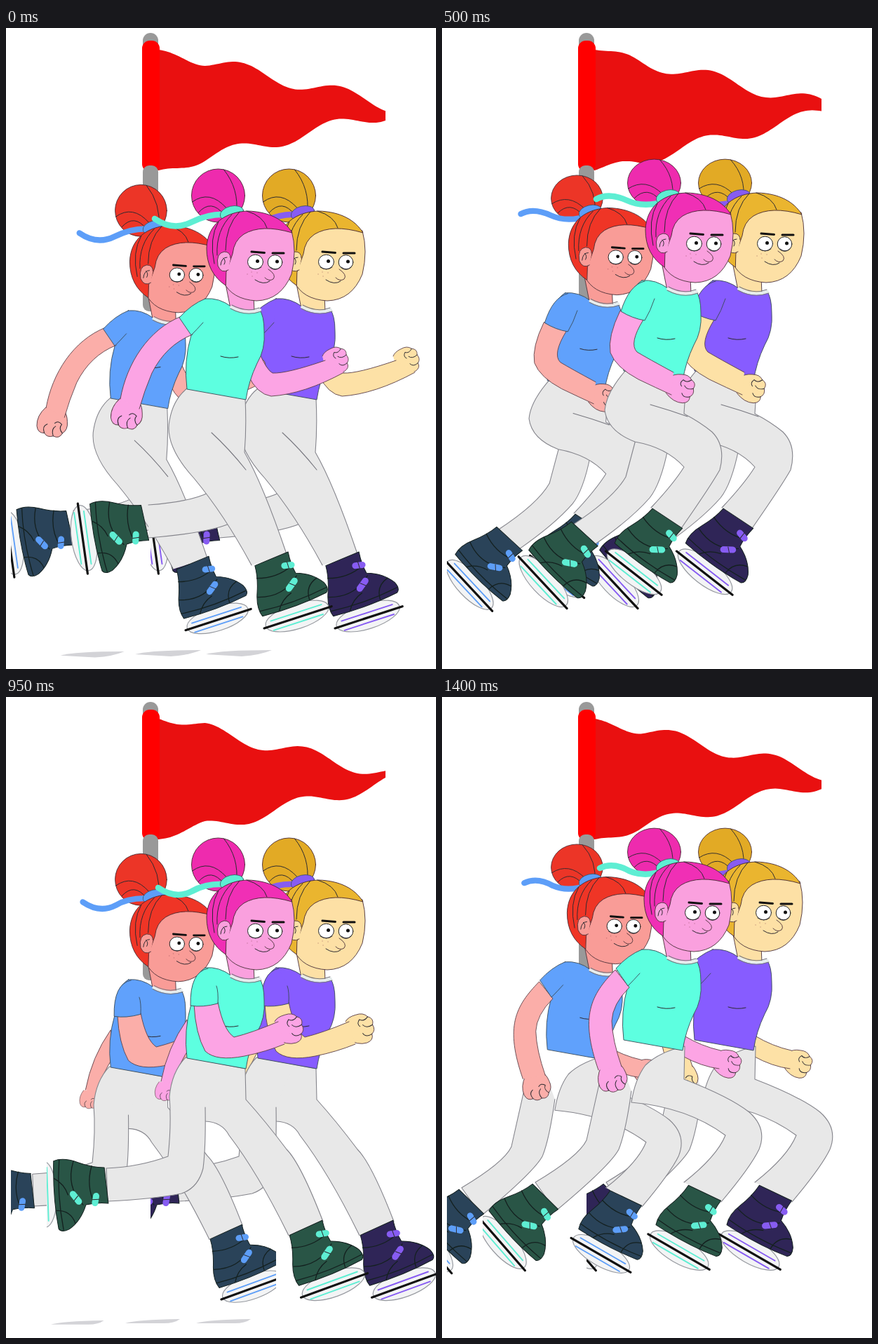
An HTML page for the animation above (1.45 s loop, 613 by 914 pixels).

```html
<!DOCTYPE html>
<html lang="en">
<head>
<meta charset="utf-8">
<title>Skaters running past a flag</title>
<style>
html, body { margin: 0; width: 100%; height: 100%; overflow: hidden; background: #fff; }
svg { display: block; width: 613px; height: 914px; }
svg * { stroke-linecap: round; stroke-linejoin: round; }
.hair { fill: var(--hair); stroke: #44262f; stroke-width: .9; }
.bun { fill: var(--bun); stroke: #44262f; stroke-width: .9; }
.face { fill: var(--face); stroke: #4a3038; stroke-width: .9; }
.arm { fill: var(--arm); stroke: #5b4048; stroke-width: .9; }
.shirt { fill: var(--shirt); stroke: #3a4a55; stroke-width: .9; }
.leg { fill: #e8e8e8; stroke: #85858c; stroke-width: 1.1; }
.boot { fill: var(--boot); stroke: #14201f; stroke-width: 1; }
.line { fill: none; stroke: #2c2a30; stroke-width: 1; }
.seam { fill: none; stroke: #14201f; stroke-width: 1.3; }
.crease { fill: none; stroke: #77777f; stroke-width: 1.1; }
.band { fill: none; stroke: var(--trim); stroke-width: 9; }
.tie { fill: var(--trim); stroke: #35505a; stroke-width: .7; }
.tail { fill: none; stroke: var(--trim); stroke-width: 8.5; }
.blade { fill: #f3f4f5; stroke: #96999f; stroke-width: 1.2; }
.edge { fill: none; stroke: var(--trim); stroke-width: 1.9; }
.shadow { fill: #d3d3d7; }
</style>
</head>
<body>
<svg viewBox="0 0 613 914">
  <defs>
    <clipPath id="c0"><rect x="206" width="407" height="914"/></clipPath>
    <clipPath id="c1"><rect x="7" width="378" height="914"/></clipPath>
    <clipPath id="c2"><rect x="58" width="555" height="914"/></clipPath>
  </defs>
  <rect x="195" y="7" width="22" height="60" rx="11" fill="#999"/>
  <path id="flag" fill="#e91010"/>
  <rect x="194" y="18" width="25" height="187" rx="11" fill="#f00"/>
  <rect x="195" y="196" width="22" height="208" rx="9" fill="#999"/>
  <g id="team"></g>
</svg>
<script>
const LOOP = 1450, STEP = 50;

const path = (cls, d) => `<path class="${cls}" d="${d}"/>`;
const group = (tf, body) => `<g transform="${tf}">${body}</g>`;

const backSleeve = "M284 386 Q264 394 247 413 L264 438 Q272 430 281 420";

const poses = [
  { dy: 0, hx: 0, bun: [239, 37], sleeve: backSleeve,
    tail: "M212 272 Q238 290 264 277 Q290 264 316 266",
    near: "M350 766 Q312 695 268 642 Q226 596 233 560 Q238 530 258 514 L341 528 Q343 570 340 605 Q366 650 400 750",
    crease: "M293 577 Q318 600 342 630", nearBoot: [378, 757, -18],
    far: "M203 680 Q262 676 290 662 L300 640 L345 640 Q350 690 320 706 Q290 720 203 727", farBoot: [198, 705, 82],
    arm: "M163 529 C172 478 203 430 250 411 L266 437 Q228 452 208 492 Q197 518 190 543", fist: [173, 549, 10, 1.05],
    farArm: "M455 474 Q400 493 380 492 Q372 488 362 465 L345 495 Q358 522 378 525 Q425 522 482 491", farFist: [469, 474, -105, .88],
    shadow: "M184 893 Q205 887 278 887 Q262 894 235 896 Z" },
  { dy: -13, hx: 1, bun: [233, 36], sleeve: backSleeve,
    tail: "M230 254 Q255 246 280 260 Q297 266 318 256",
    near: "M277 572 Q272 640 262 680 Q254 702 207 758 L165 724 Q212 682 225 640 Q231 600 231 560 Q238 515 262 503 L310 510",
    nearBoot: [184, 742, 39],
    far: "M376 732 Q432 680 448 655 Q460 625 425 600 Q390 572 345 552 L345 516 L262 503 L277 595 Q330 600 397 642 Q385 658 345 695",
    farBoot: [360, 713, 46],
    arm: "M148 510 C162 462 205 412 250 396 L265 423 Q228 440 203 475 Q190 495 180 516", fist: [161, 527, 12, .95],
    farArm: "M433 475 Q390 486 350 480 L345 513 Q400 514 445 501", farFist: [444, 483, -100, .95] },
  { dy: -26, hx: 2, bun: [221, 33], sleeve: backSleeve,
    tail: "M225 244 Q244 235 267 248 Q290 258 318 247",
    near: "M270 562 Q262 620 252 645 Q240 668 162 733 L133 692 Q195 655 206 632 L224 552 L262 540",
    nearBoot: [147, 712, 49],
    far: "M398 720 Q440 670 452 645 Q464 615 438 592 Q410 570 345 545 L346 498 Q310 506 290 525 Q275 545 270 578 Q350 585 404 625 Q392 655 345 692",
    farBoot: [374, 707, 30],
    arm: "M223 532 C196 455 212 425 247 389 L267 414 Q243 438 242 462 Q243 490 256 527", fist: [243, 542, -12, .98],
    farArm: "M397 504 Q370 498 345 483 L343 512 Q370 527 395 530", farFist: [406, 522, -70, .92] },
  { dy: 0, hx: 0, bun: [239, 37], sleeve: "M288 387 Q262 392 263 440 Q280 443 302 437 Q303 420 300 412",
    tail: "M217 272 Q242 289 265 277 Q285 265 316 267",
    near: "M284 585 Q285 640 281 672 Q274 700 250 708 Q210 716 145 719 L143 672 Q190 670 231 655 Q236 610 233 570 Q236 535 256 514 L310 524",
    nearBoot: [143, 696, 88],
    far: "M452 748 Q420 665 400 645 Q370 605 342 574 L341 530 L262 515 L284 605 Q308 606 318 625 Q360 680 403 768",
    farBoot: [427, 757, -20],
    arm: "M388 463 Q350 479 325 485 Q310 475 302 435 L268 438 Q270 480 284 505 Q300 520 340 512 Q370 506 397 495", fist: [402, 473, -95, 1],
    farArm: "M221 548 Q230 500 258 460 L262 500 Q248 520 236 553", farFist: [227, 561, 0, .68],
    shadow: "M170 893 Q185 888 248 887 Q240 893 225 893 Z" },
  { dy: -13, hx: 1, bun: [233, 36], sleeve: "M288 387 Q264 392 256 437 Q276 444 297 441 Q300 425 301 412",
    tail: "M222 256 Q246 255 270 263 Q295 262 318 257",
    near: "M350 730 Q400 675 415 650 Q425 615 395 592 Q370 570 345 558 L345 516 L262 503 Q234 525 232 560 Q240 590 280 597 Q330 605 360 642 Q350 660 308 698",
    crease: "M297 550 Q325 558 346 566", nearBoot: [328, 714, 45],
    far: "M325 590 Q318 660 300 690 Q285 715 248 758 L206 724 Q255 680 266 640 L275 580 L320 590", farBoot: [226, 741, 39],
    arm: "M362 475 Q330 487 305 478 Q292 465 296 426 L258 424 Q250 465 262 490 Q275 512 315 512 Q345 512 368 508", fist: [378, 491, -85, .98],
    farArm: "M224 538 Q232 490 258 450 L262 490 Q250 510 243 540", farFist: [234, 550, 0, .7] },
  { dy: -26, hx: 4, bun: [221, 33], sleeve: "M288 387 Q266 392 254 430 Q270 440 288 443 Q296 430 302 412",
    tail: "M220 244 Q238 234 264 246 Q288 257 318 247",
    near: "M342 712 Q385 650 396 630 Q405 596 385 576 Q368 562 345 550 L348 502 L262 488 Q234 520 232 545 Q236 575 275 590 Q320 598 345 626 Q330 650 298 684",
    crease: "M297 537 Q325 545 350 554", nearBoot: [321, 699, 38],
    far: "M322 600 Q312 650 296 670 Q270 700 217 737 L187 708 Q245 670 262 640 L278 580 L320 590", farBoot: [203, 721, 47],
    arm: "M330 491 Q293 471 278 462 Q266 450 287 416 L254 403 Q236 440 240 463 Q248 484 280 501 Q305 513 327 523", fist: [339, 513, -75, .95],
    farArm: "", farFist: null }
];

function boot([x, y, r]) {
  return group(`translate(${x} ${y}) rotate(${r})`,
    '<ellipse class="blade" cx="10" cy="89" rx="47" ry="18"/>' +
    path("edge", "M-28 84 H48") + path("edge", "M-28 98 H46") +
    '<path d="M-40 91 H61" stroke="#111" stroke-width="3.2"/>' +
    path("boot", "M-25 2 L26 -2 Q24 15 27 30 Q50 38 61 55 Q66 66 60 70 Q15 77 -37 74 Q-42 60 -34 40 Q-26 20 -25 2 Z") +
    path("seam", "M-28 20 Q0 29 25 18 M-35 46 Q0 58 27 34 M-12 74 Q-4 60 12 55 M34 72 Q34 52 53 46 M-38 66 Q10 71 62 63") +
    path("band", "M15 15 L25 17 M11 48 L22 40") +
    path("line", "M20 11 V21 M14 41 L21 47"));
}

function fist(f) {
  if (!f) return "";
  const [x, y, r, s] = f;
  return group(`translate(${x} ${y}) rotate(${r}) scale(${s})`,
    path("arm", "M-13 -18 Q-24 -4 -21 10 Q-18 20 -9 18 Q-4 24 4 20 Q13 23 16 14 Q23 8 20 -3 Q18 -14 12 -18") +
    path("line", "M-9 18 Q-14 9 -7 5 M4 20 Q-1 11 5 6 M16 14 Q9 8 13 2 Q7 -3 3 2"));
}

const arm = (d, f) => fist(f) + (d ? path("arm", d) : "");

const eye = (x, y, rx) =>
  `<ellipse cx="${x}" cy="${y}" rx="${rx}" ry="10.3" fill="#fff" stroke="#222" stroke-width="1"/>` +
  `<circle cx="${x + 3}" cy="${y - 1}" r="2.5" fill="#111"/>`;

const neck = path("face", "M312 360 L320 400 Q340 415 354 405 L353 380");

const skull =
  path("face", "M310 362 Q322 387 357 389 Q392 388 407 351 Q415 318 407 289 Q370 276 334 292 Q306 310 310 362 Z") +
  path("hair", "M313 367 Q286 349 286 314 C287 280 312 262 345 261 C376 262 397 274 408 292 Q364 279 339 294 Q325 303 323 322 L314 348 Z") +
  path("line", "M322 266 Q299 288 301 324 M333 262 Q313 282 313 317 M343 261 Q367 268 372 285 M303 276 Q289 300 297 336") +
  path("face", "M317 345 Q307 351 302 339 Q299 321 311 319 Q320 319 320 328") +
  path("line", "M306 338 Q307 327 315 327 M310 328 Q314 332 311 337") +
  eye(355.5, 333.5, 11) + eye(383.5, 334, 10.3) +
  path("line", "M347 341 Q356 347 364 341 M377 341 Q384 347 391 341") +
  '<path d="M350 319 L368.5 320.5 M380 321 L396 321" stroke="#111" stroke-width="3" stroke-linecap="butt"/>' +
  path("face", "M374 344 Q386 352 381 358 Q375 362 369 356") +
  path("line", "M355 359 Q367 367 376 361") +
  '<path d="M344 351 h.1 M350 348 h.1 M351 354 h.1 M358 349 h.1" stroke="#8a4050" stroke-opacity=".4" stroke-width="1.5"/>';

function head(p) {
  const [cy, ry] = p.bun, ty = 264 + p.dy * .88;
  const bun = group(`translate(302.5 ${cy}) scale(1 ${ry / 37})`,
    '<circle class="bun" r="38"/>' +
    path("line", "M8 -37 Q30 -10 26 26 M-37 9 Q-12 -9 12 18 Q17 25 17 30 M-28 24 Q-10 4 8 27"));
  const tie = `<ellipse class="tie" cx="322" cy="${ty}" rx="17" ry="10" transform="rotate(-14 322 ${ty})"/>`;
  return bun + path("tail", p.tail) + tie + group(`translate(${p.hx} ${p.dy})`, skull);
}

const torso = neck + path("shirt",
  "M284 386 Q304 384 322 398 Q342 409 361 401 Q368 410 368 432 Q370 458 358 478 Q346 503 342 530 L258 515 Q253 475 264 438 Q262 400 284 386 Z") +
  path("line", "M306 468 Q318 472 331 469") +
  '<path d="M321 398 Q342 409 362 402" fill="none" stroke="#e6eded" stroke-width="4"/>' +
  path("crease", "M320 400 Q342 412 364 404 M322 395 Q342 406 361 399");

function figure(p) {
  const shift = `translate(${p.dy ? 1 : 0} ${p.dy})`;
  return (p.shadow ? path("shadow", p.shadow) : "") +
    arm(p.farArm, p.farFist) +
    path("leg", p.far) + boot(p.farBoot) +
    path("leg", p.near) + (p.crease ? path("crease", p.crease) : "") + boot(p.nearBoot) +
    group(shift, torso) + head(p) +
    arm(p.arm, p.fist) +
    group(shift, path("shirt", p.sleeve));
}

// Back to front
const girls = [
  { place: "translate(101 0)", hair: "#eab52f", bun: "#e2aa25", face: "#fde0a5", arm: "#fde1a6", shirt: "#875cff", boot: "#2f2557", trim: "#875cf2" },
  { place: "translate(-101 28.5) scale(.97)", hair: "#ef3526", bun: "#ec3527", face: "#f99c97", arm: "#fbaea9", shirt: "#60a1fc", boot: "#2a4359", trim: "#5d9ef8" },
  { place: "translate(0 0)", hair: "#f02fb5", bun: "#ee2bae", face: "#faa0de", arm: "#fca4e4", shirt: "#5dffe0", boot: "#295546", trim: "#5eeed3" }
];

const figures = poses.map(p => `<g class="pose">${figure(p)}</g>`).join("");
document.getElementById("team").innerHTML = girls.map((g, i) => {
  const vars = ["hair", "bun", "face", "arm", "shirt", "boot", "trim"].map(k => `--${k}:${g[k]}`).join(";");
  return `<g clip-path="url(#c${i})"><g transform="${g.place}" style="${vars}">${figures}</g></g>`;
}).join("");

const shown = [...document.querySelectorAll(".pose")];
const flag = document.getElementById("flag");

function flagPath(phase) {
  const top = [], low = [];
  const wave = (x, crest) => 10 * Math.min(1, Math.max(0, x - 218) / 66) *
    Math.cos(2 * Math.PI * ((x - crest) / 140 - phase));
  for (let i = 0; i <= 100; i++) {
    const x = 211 + 3.3 * i, u = Math.max(0, x - 218);
    top.push(`${x.toFixed(1)} ${(31 + .24 * u - wave(x, 337)).toFixed(1)}`);
    low.unshift(`${x.toFixed(1)} ${(203 - .25 * u - wave(x, 326)).toFixed(1)}`);
  }
  return "M" + top.concat(low).join("L") + "Z";
}

let last = -1;
function draw(ms) {
  const tick = Math.floor((ms % LOOP) / STEP + 1e-6);
  if (tick === last) return;
  last = tick;
  flag.setAttribute("d", flagPath(tick * STEP / LOOP));
  const now = (tick >> 1) % poses.length;
  shown.forEach((el, i) => { el.style.display = i % poses.length === now ? "" : "none"; });
}

const start = performance.now();
function loop() {
  draw(performance.now() - start);
  requestAnimationFrame(loop);
}
loop();
</script>
</body>
</html>
```
